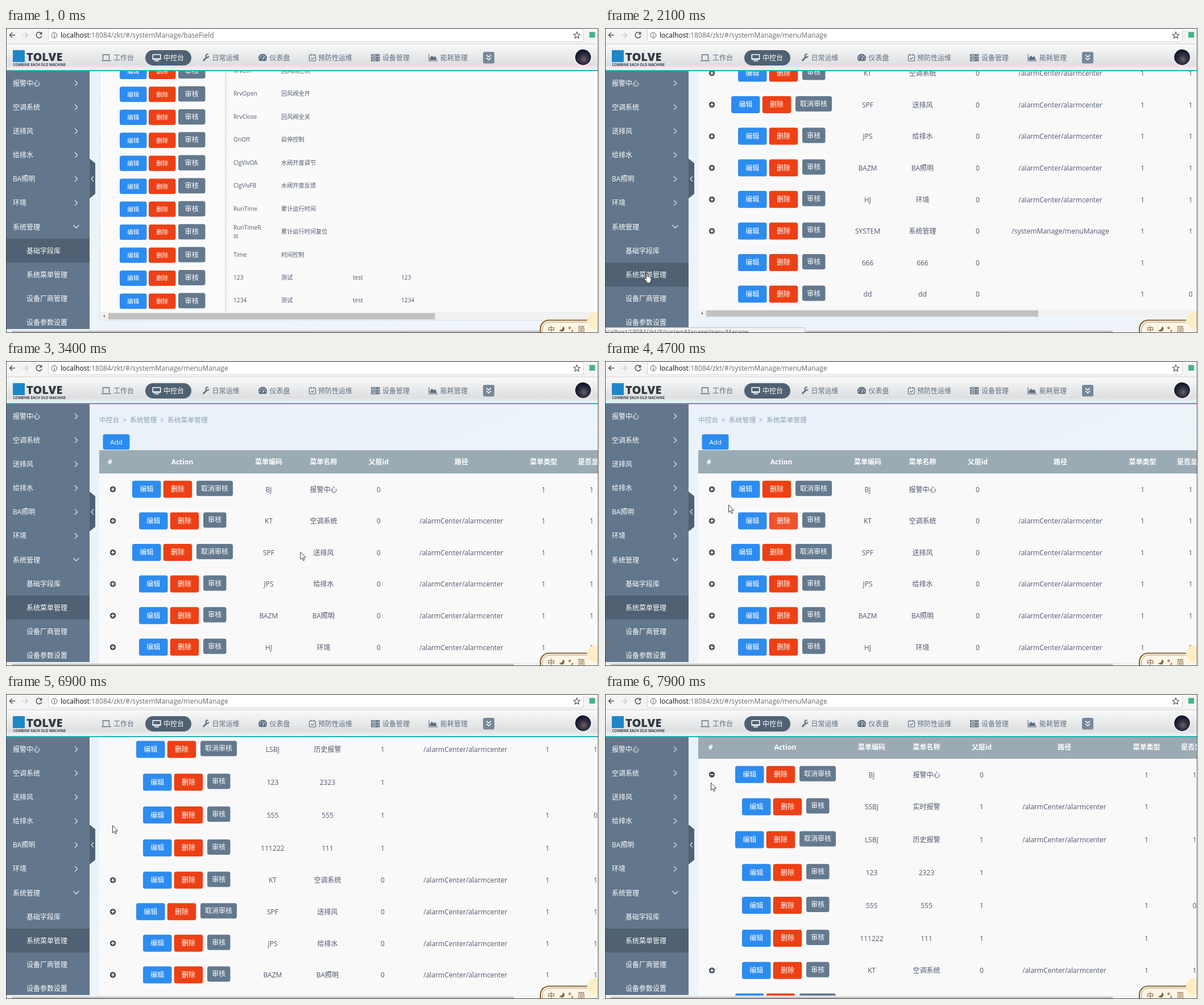
Write an HTML page that moves like this. It is 1043 px wide and 537 px high and loops after 8000 ms.

```html
<!DOCTYPE html>
<html lang="zh-CN">
<head>
<meta charset="utf-8">
<title>菜单管理</title>
<style>
html, body { margin: 0; width: 100%; height: 100%; overflow: hidden; background: #fff; }
svg { display: block; width: 100vw; height: 100vh; font-family: "Open Sans", "Noto Sans CJK SC", "Noto Sans CJK", sans-serif; }
text { white-space: pre; }
</style>
</head>
<body>
<svg id="stage" viewBox="0 0 1043 537"></svg>
<script>
const LOOP = 8000;
const BLUE = '#2d8cf0', RED = '#ed4014', SLATE = '#64798e', DARK = '#4f6172', INK = '#515a6e';

// Markup helpers; text is placed by its vertical centre.
const rect = (x, y, w, h, fill, more = '') =>
  `<rect x="${x}" y="${y}" width="${w}" height="${h}" fill="${fill}" ${more}/>`;
const text = (x, y, str, size = 12, fill = INK, more = '') =>
  `<text x="${x}" y="${y + size * 0.37}" font-size="${size}" fill="${fill}" ${more}>${str}</text>`;
const MID = 'text-anchor="middle"';
const mid = (x, y, str, size, fill, more = '') => text(x, y, str, size, fill, MID + ' ' + more);
const line = (d, color, width = 1.4, more = '') =>
  `<path d="${d}" fill="none" stroke="${color}" stroke-width="${width}" ${more}/>`;
const fill = (d, color) => `<path d="${d}" fill="${color}"/>`;
const group = (id, body, more = '') => `<g id="${id}" ${more}>${body}</g>`;
const button = (x, y, w, h, label, color, size = 12, more = '') =>
  rect(x, y, w, h, color, `rx="3.5" ${more}`) + mid(x + w / 2, y + h / 2, label, size, '#fff');

function fieldPage() {
  const rows = [
    ['RrvCtrl', '回风阀控制'], ['RrvOpen', '回风阀全开'], ['RrvClose', '回风阀全关'],
    ['OnOff', '启停控制'], ['ClgVlvOA', '水阀开度调节'], ['ClgVlvFB', '水阀开度反馈'],
    ['RunTime', '累计运行时间'], ['RunTimeR', '累计运行时间复位'], ['Time', '时间控制'],
    ['123', '测试', 'test', '123'], ['1234', '测试', 'test', '1234']
  ];
  const cols = [400, 484, 610, 695];
  let s = rect(165, 76, 876, 438, '#fafafb') + rect(165, 76, 220, 424, '#fbfbfb') +
    rect(385, 76, 5, 424, 'url(#shade)') + line('M165 76V514.5H1041', '#dcdfe3', 1);
  rows.forEach((row, i) => {
    const y = 75.2 + i * 40.45;
    s += rect(165, y + 20, 876, 0.7, '#f2f3f5');
    s += button(200, y - 12.3, 47.5, 27, '编辑', BLUE, 10.5, '').replace('<text', '<text font-weight="500"');
    s += button(251, y - 12.3, 47.5, 27, '删除', RED, 10.5).replace('<text', '<text font-weight="500"');
    s += button(303, y - 13.2, 47.5, 27, '审核', SLATE, 12.3);
    row.forEach((cell, k) => {
      const wraps = cell === 'RunTimeR';
      s += text(cols[k], wraps ? y - 7.5 : y, cell, 10.2);
      if (wraps) s += text(cols[k], y + 7.5, 'st', 10.2);
    });
  });
  return s + rect(166, 500, 875, 14, '#f1f1f1') + rect(180, 502, 574.5, 11, '#c1c1c1') +
    fill('M171 507.5L174 505V510Z', '#777');
}

const ROOT = '/alarmCenter/alarmcenter';
const items = [
  { cells: ['BJ', '报警中心', 0, '', 1, 1], icon: 1, cancel: 1 },
  { cells: ['KT', '空调系统', 0, ROOT, 1, 1], icon: 1 },
  { cells: ['SPF', '送排风', 0, ROOT, 1, 1], icon: 1, cancel: 1 },
  { cells: ['JPS', '给排水', 0, ROOT, 1, 1], icon: 1 },
  { cells: ['BAZM', 'BA照明', 0, ROOT, 1, 1], icon: 1 },
  { cells: ['HJ', '环境', 0, ROOT, 1, 1], icon: 1 },
  { cells: ['SYSTEM', '系统管理', 0, '/systemManage/menuManage', 1, 1], icon: 1 },
  { cells: ['666', '666', 0, '', 1, ''] },
  { cells: ['dd', 'dd', 0, '', 1, 0] }
];
const children = [
  { cells: ['SSBJ', '实时报警', 1, ROOT, 1, ''] },
  { cells: ['LSBJ', '历史报警', 1, ROOT, 1, 1], cancel: 1 },
  { cells: ['123', '2323', 1, '', '', ''] },
  { cells: ['555', '555', 1, '', 1, 0] },
  { cells: ['111222', '111', 1, '', 1, ''] }
].map(c => ({ ...c, child: 1 }));

function menuTable(open) {
  const dx = open ? 7 : 0;
  const cols = [462, 558.5, 655.5, 801, 945.5, 1030].map(x => x + dx);
  const rows = open ? [items[0], ...children, ...items.slice(1)] : items;
  const head = (x, str) => mid(x, 177.5, str, 12, '#fff', 'font-weight="700"');
  let s = rect(164, 157, 877, 41, '#9aabb4') + head(open ? 186 : 183, '#') + head(310 + dx, 'Action');
  ['菜单编码', '菜单名称', '父层id', '路径', '菜单类型', '是否显示'].forEach((h, i) => s += head(cols[i], h));
  let top = 198;
  rows.forEach((row, i) => {
    const h = row.child ? 57.85 : 55.6, y = top + h / 2;
    s += rect(164, top, 877, h + 0.5, '#f9f9fa') + rect(164, top + h - 0.5, 877, 1, '#eff0f2');
    if (row.icon) {
      const minus = open && i === 0;
      s += `<circle cx="188" cy="${y}" r="5.2" fill="#414e5b"/>` +
        line(`M185 ${y}h6` + (minus ? '' : `M188 ${y - 3}v6`), '#fff', 1.5);
    }
    const x = (row.cancel ? 222 : 234) + dx;
    const hot = !open && row.cells[0] === 'KT' ? 'id="hot"' : '';
    s += button(x, y - 15, 50.5, 30, '编辑', BLUE) + button(x + 54.7, y - 15, 50.5, 30, '删除', RED, 12, hot) +
      button(x + 113, y - 15, row.cancel ? 64 : 40.5, 27, row.cancel ? '取消审核' : '审核', SLATE);
    row.cells.forEach((cell, k) => { if (cell !== '') s += mid(cols[k], y + 0.3, cell, 12.05); });
    top += h;
  });
  return s + rect(164, top, 877, 12.5, '#f1f1f1') + rect(178, top + 0.8, 584, 11, '#c1c1c1') +
    fill(`M169 ${top + 6}l3 -2.5v5Z`, '#777');
}

function menuPage() {
  const crumb = '#8e9fb0';
  return [[164, '中控台'], [205, '&gt;'], [218, '系统管理'], [271, '&gt;'], [284, '系统菜单管理']]
    .map(([x, str]) => text(x, 104, str, 11.8, crumb)).join('') +
    button(170.5, 129, 47, 27, 'Add', BLUE, 11.6) +
    group('closed', menuTable(false)) + group('open', menuTable(true));
}

function sidebar() {
  let s = rect(1, 76, 146, 454, '#62778c') + group('pick', rect(1, 371, 146, 42, DARK));
  ['报警中心', '空调系统', '送排风', '给排水', 'BA照明', '环境', '系统管理'].forEach((name, i) => {
    const y = 97.3 + i * 42.13;
    s += text(12, y, name, 12, '#fff') +
      line(i < 6 ? `M121 ${y - 4.7}l4.7 4.7l-4.7 4.7` : `M118.5 ${y - 3}l5 5l5 -5`, '#dfe5ea', 1.3);
  });
  ['基础字段库', '系统菜单管理', '设备厂商管理', '设备参数设置'].forEach((name, i) =>
    s += text(36, 392.2 + i * 42.13, name, 12, '#fff'));
  return s + fill('M147 230L157 238V292L147 300Z', DARK) + line('M154 261l-4 4.5l4 4.5', '#dfe5ea', 1.2);
}

function browserBar() {
  const grey = '#505357';
  return rect(0, 0, 1042, 28, '#f4f4f4') + rect(74.5, 1, 941, 23, '#fff', 'stroke="#d2d2d2" rx="2"') +
    rect(0, 27.5, 1042, 1, '#cfcfcf') +
    line('M16 12.5H6.5M11 8l-4.5 4.5L11 17', grey, 1.5) +
    line('M29 12.5H38.5M34 8l4.5 4.5L34 17', '#cdcdcd', 1.5) +
    line('M62 9.2A5 5 0 1 0 63 13.8', grey, 1.5) + fill('M63.3 6.6V11.4H58.5Z', grey) +
    `<circle cx="85" cy="12.7" r="4.8" fill="none" stroke="${grey}"/>` + line('M85 9.7v1.2M85 12v3.7', grey, 1.2) +
    `<text x="96" y="17.2" font-size="12.15" fill="#6b6b6b"><tspan fill="#111">localhost</tspan>:18084/zkt/#/systemManage/<tspan id="route"></tspan></text>` +
    line('M1004 7l1.6 3.7l4 .4l-3 2.7l.9 4l-3.5 -2.1l-3.5 2.1l.9 -4l-3 -2.7l4 -.4Z', grey, 1.1) +
    rect(1026, 7, 10, 10, '#41b883');
}

function appHeader() {
  const c = '#5d6f80';
  let s = rect(0, 28, 1042, 46, 'url(#metal)') + rect(0, 74, 1042, 2, '#1cb3b5');
  s += rect(12, 39, 21, 21, '#1f86c8') + text(36, 50.5, 'TOLVE', 20, '#333c45', 'font-weight="800"') +
    text(12.5, 64.5, 'COMBINE EACH OLD MACHINE', 6.2, '#39424b', 'font-weight="700"');
  s += rect(245, 39, 81, 27, DARK, 'rx="13.5"');
  [[189, '工作台'], [277, '中控台', '#fff'], [362.5, '日常运维'], [463.5, '仪表盘'],
    [549, '预防性运维'], [662, '设备管理'], [764, '能耗管理']]
    .forEach(([x, name, color]) => s += text(x, 52.5, name, 12, color || c));
  // laptop, monitor, wrench
  s += line('M170.5 56V47H181.5V56M168 57.5H184.5', c, 1.3);
  s += rect(257.5, 46, 15, 10, '#fff', 'rx="1.2"') + rect(259, 47.5, 12, 6, DARK) + rect(261, 57, 8, 1.6, '#fff');
  s += line('M347.5 57l5.5 -5.5', c, 2.8, 'stroke-linecap="round"') +
    line('M355.8 46.8a2.7 2.7 0 1 0 1 2.8', c, 2);
  // gauge
  s += fill('M446 58A7.5 7.5 0 1 1 457 58Z', c) + line('M451.5 56l1.5 -5', '#f0f0f0', 1.3) +
    [[446.5, 53.5], [448, 50], [451.5, 48.5], [455, 50], [456.5, 53.5]]
      .map(([x, y]) => `<circle cx="${x}" cy="${y}" r=".9" fill="#f0f0f0"/>`).join('');
  // calendar, server, chart
  s += rect(533.5, 47.5, 11, 10.5, 'none', `stroke="${c}" stroke-width="1.2" rx="1"`) +
    line('M536.5 45.5v3M541.5 45.5v3M536.5 53l2 2l3.5 -3.7', c, 1.2);
  for (let i = 0; i < 3; i++) {
    const y = 46 + i * 4.4;
    s += rect(642, y, 15.5, 3.6, c, 'rx=".8"') + rect(644, y + 1.3, 7, 1, '#e8e8e8') + rect(654, y + 1.2, 1.4, 1.2, '#e8e8e8');
  }
  s += line('M744 46V58H759.5', c, 1.2) + fill('M745.5 56.5V53L749 48.5L752 51.5L755 49.5L758 56.5Z', c);
  s += rect(839, 42, 20, 20.5, '#77889a', 'rx="3"') +
    line('M845 47.5l4 3.6l4 -3.6M845 52.5l4 3.6l4 -3.6', '#fff', 1.6);
  return s + '<circle cx="1015" cy="51.5" r="14.5" fill="url(#photo)" stroke="#fff" stroke-width="1.2"/>';
}

function imeBar() {
  const brown = '#86643c';
  return rect(940, 514.5, 125, 50, '#fdf6e7', `rx="15" stroke="${brown}" stroke-width="2.2"`) +
    rect(943.5, 518, 120, 50, 'none', 'rx="12" stroke="#b99a6c" stroke-width="1"') +
    mid(959, 530, '中', 13, brown, 'font-weight="500"') +
    fill('M979.5 525A5 5 0 1 1 973 532A6 6 0 0 0 979.5 525Z', brown) +
    `<circle cx="991.5" cy="528" r="1.6" fill="none" stroke="${brown}" stroke-width="1.2"/>` +
    line('M996 531.5q1 1.5 -1.2 3.5', brown, 1.8) +
    mid(1012, 530, '简', 13, brown, 'font-weight="500"') +
    '<circle cx="1037" cy="515" r="15" fill="#fbeec6"/>';
}

const HAND = 'M3.6 10.5V2.2Q3.6 .7 4.8 .7T6 2.2V6.6Q7.4 5.9 8.2 7.1Q9.6 6.6 10.2 7.9Q12 7.6 12 9.4V12.5Q12 14.5 10.8 16V18H4.8V16.4L.6 11.4Q.3 9.7 1.7 9.6Q2.6 9.6 3.6 10.5Z';
const ARROW = 'M.5 .5V13.4L3.4 10.8L5.4 15.4L7.4 14.5L5.5 10H9.6Z';
const pointer = (id, d) => `<path id="${id}" d="${d}" fill="#fff" stroke="#222" stroke-width=".9"/>`;

const stage = document.getElementById('stage');
stage.innerHTML = `<defs>
  <linearGradient id="metal" x2="0" y2="1"><stop stop-color="#fafafa"/><stop offset=".45" stop-color="#e9eaeb"/><stop offset=".8" stop-color="#dedfe1"/><stop offset="1" stop-color="#f3f4f5"/></linearGradient>
  <linearGradient id="sky" x2="1" y2="1"><stop stop-color="#e9f2f9"/><stop offset="1" stop-color="#eff5fa"/></linearGradient>
  <linearGradient id="shade"><stop stop-color="#dfe0e2"/><stop offset="1" stop-color="#dfe0e2" stop-opacity="0"/></linearGradient>
  <radialGradient id="photo" cx=".55" cy=".62"><stop stop-color="#75635c"/><stop offset=".45" stop-color="#37374a"/><stop offset="1" stop-color="#15192d"/></radialGradient>
  <clipPath id="view"><rect x="147" y="76" width="894" height="455"/></clipPath>
</defs>` +
  rect(0, 76, 1042, 461, 'url(#sky)') +
  `<g clip-path="url(#view)">${group('fields', fieldPage())}${group('menus', menuPage())}</g>` +
  sidebar() + rect(1, 531, 1040, 6, '#f1f1f1') + rect(10, 533, 883, 3.5, '#c1c1c1', 'id="thumb"') +
  appHeader() + browserBar() +
  group('status', rect(-3, 527.5, 355, 14, '#f2f2f2', 'stroke="#c4c4c4" rx="2"') +
    text(-5, 535.5, 'localhost:18084/zkt/#/systemManage/menuManage', 10.6, '#666')) +
  group('busy', rect(1, 28, 1, 2, BLUE, 'id="bar"') + rect(1037, 54.5, 4, 1.8, BLUE)) +
  imeBar() +
  line('M0 .5H1042M.5 0V537M1041.5 0V537M0 536.5H1042', '#454a50', 1) + rect(1042, 0, 1, 537, '#fff') +
  group('cursor', pointer('arrow', ARROW) + pointer('hand', HAND));

const el = id => document.getElementById(id);
const show = (id, on) => el(id).setAttribute('visibility', on ? 'inherit' : 'hidden');

// Linear value between [time, ...values] points.
function at(keys, t) {
  let i = keys.findIndex(k => k[0] > t);
  if (i === 0) return keys[0].slice(1);
  if (i < 0) return keys[keys.length - 1].slice(1);
  const a = keys[i - 1], b = keys[i], p = (t - a[0]) / (b[0] - a[0]);
  return a.slice(1).map((v, k) => v + (b[k + 1] - v) * p);
}

const path = [
  [400, 1030, 29], [600, 800, 180], [800, 360, 380], [1000, 82, 432], [1100, 42, 429], [1200, 64, 431], [1300, 69, 431],
  [2300, 69, 431], [2600, 300, 410], [2800, 520, 386], [3000, 606, 375], [3200, 585, 354],
  [3600, 450, 318], [4100, 322, 292], [4400, 317, 290], [4500, 317, 290], [4600, 265, 272], [4700, 217, 253],
  [4900, 198, 238], [5400, 184, 223], [6600, 184, 223], [6900, 187, 231], [7500, 187, 231],
  [7800, 184, 176], [7900, 186, 156]
];
const scroll = [
  [3000, 202], [3100, 84], [3200, 0], [6600, 0], [6700, 34], [6800, 150], [6900, 243], [7000, 250], [7100, 252],
  [7200, 252], [7300, 150], [7400, 84]
];
const glow = [[3900, 0], [4100, 1], [4600, 1], [4800, 0]];
const load = [[1500, 3], [1700, 12], [1800, 1040]];

function draw(ms) {
  const t = Math.floor(ms / 100) * 100;
  const routed = t >= 1500, swapped = t >= 1900, open = t >= 5700;
  el('route').textContent = routed ? 'menuManage' : 'baseField';
  el('pick').setAttribute('transform', `translate(0 ${routed ? 42.1 : 0})`);
  show('status', routed && t < 2400);
  show('busy', routed && !swapped);
  el('bar').setAttribute('width', at(load, t)[0]);
  el('thumb').setAttribute('width', swapped ? 883 : 930);

  show('fields', !swapped);
  show('menus', swapped);
  show('closed', !open);
  show('open', open);
  el('menus').setAttribute('opacity', t < 2100 ? 0.6 : 1);
  el('menus').setAttribute('transform', `translate(0 ${-at(scroll, t)[0]})`);
  const g = at(glow, t)[0];
  el('hot').setAttribute('fill', `rgb(${237 + 4 * g},${64 + 38 * g},${20 + 47 * g})`);

  const [x, y] = at(path, t), link = x < 147;
  show('cursor', t >= 400);
  show('hand', t >= 400 && link);
  show('arrow', t >= 400 && !link);
  el('cursor').setAttribute('transform', `translate(${x} ${y})`);
}

const start = performance.now();
function tick() {
  draw((performance.now() - start) % LOOP);
  requestAnimationFrame(tick);
}
tick();
</script>
</body>
</html>
```
